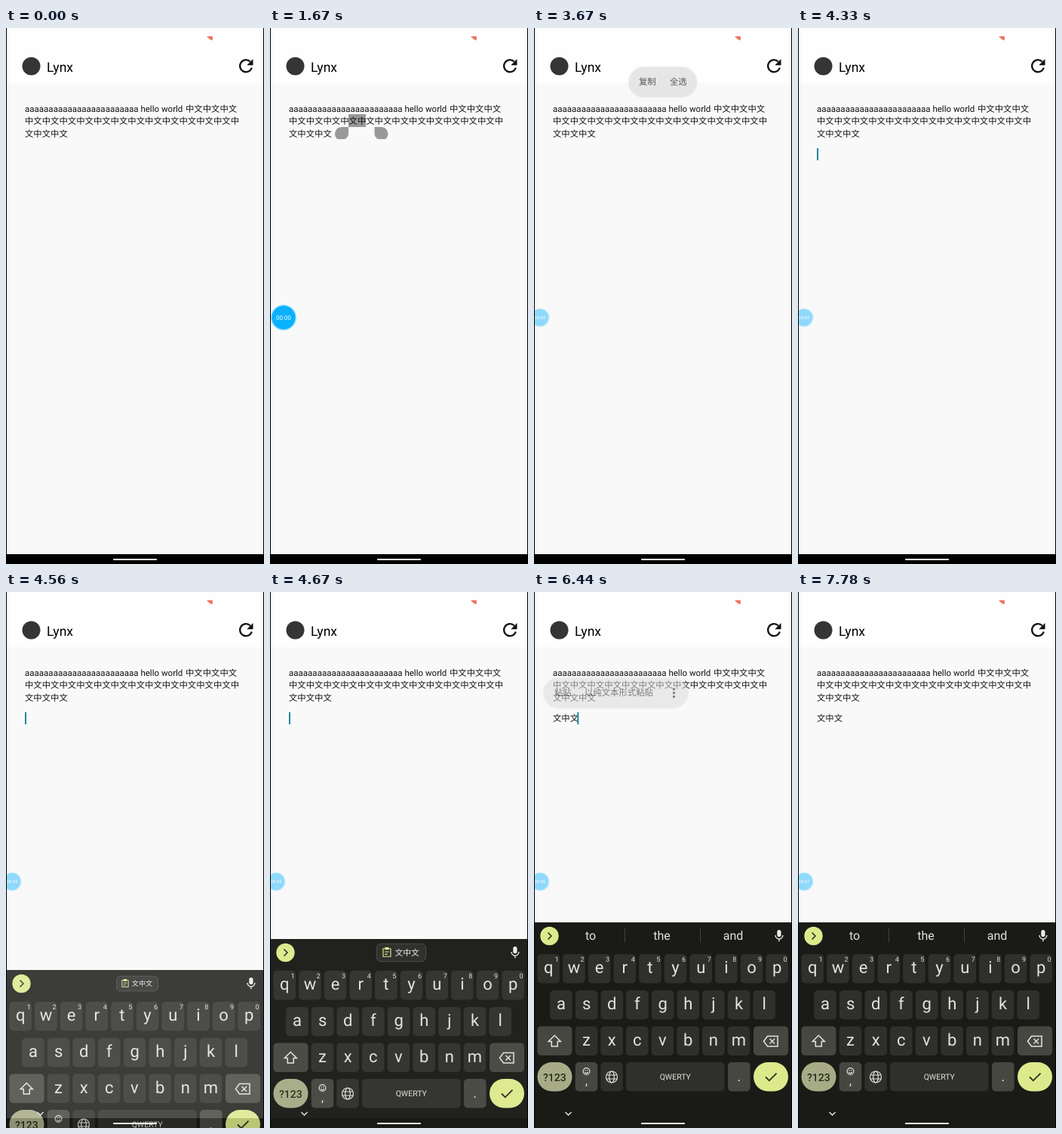
These frames come from a looping animation (342x709 px, 8 s). An HTML page:

```html
<!DOCTYPE html>
<html lang="zh-CN">
<head>
<meta charset="utf-8">
<title>Text selection</title>
<style>
html, body { margin: 0; width: 100%; height: 100%; overflow: hidden; background: #f9f9f9; }
svg { display: block; width: 342px; height: 709px; text-rendering: geometricPrecision; }
text { font-family: Roboto, "Noto Sans CJK SC", "Noto Sans CJK", sans-serif; white-space: pre; }
.zh { font: 11.36px "Noto Sans CJK SC", "Noto Sans CJK", "Noto Sans", sans-serif; fill: #111; }
.mid { text-anchor: middle; }
.line { fill: none; stroke: #e4e4dc; stroke-width: 1.5; }
.menu { filter: drop-shadow(0 .5px 1.5px #0003); }
#chip { transform-box: fill-box; transform-origin: center; }
#keys text { fill: #e4e4dc; }
#keys .dark { fill: #292b1c; }
</style>
</head>
<body>
<svg viewBox="0 0 342 709">
  <rect width="342" height="709" fill="#f9f9f9"/>
  <rect width="342" height="73" fill="#fefefe"/>
  <path d="M266 11h7.8v5.5l-3.8-1.7z" fill="#f0705a"/>
  <circle cx="33.5" cy="50.5" r="12" fill="#353535"/>
  <text x="54" y="57.5" font-size="17.6">Lynx</text>
  <path d="M325.8 52.5A8 8 0 1 1 323.7 44.4" fill="none" stroke="#111" stroke-width="2.3"/>
  <path d="M327.5 41v8.2h-8.2z" fill="#111"/>

  <g id="selection" fill="#999">
    <rect id="range" x="104" y="114" width="34.5" height="17"/>
    <path d="M104 131H95a9 9 0 0 0-5.5 16H99q5-2 5-8z"/>
    <path d="M138.500 131h9a9 9 0 0 1 5.500 16h-9.500q-5-2-5-8z"/>
  </g>
  <text x="25" y="110.600" font-size="11.54" fill="#111">aaaaaaaaaaaaaaaaaaaaaaaa hello world</text>
  <g id="paragraph"></g>
  <text id="pasted" class="zh" x="25" y="171.300">文中文</text>
  <rect id="caret" x="25" y="159" width="2" height="16" fill="#1b8a96"/>
  <path id="caretHandle" d="M26 175.500l6 5.500a8.500 8.500 0 1 1-12 0z" fill="#1b8a96"/>

  <g id="copyMenu">
    <rect id="copyBox" class="menu" x="126" y="52" width="89.500" height="39" rx="19.500" fill="#fff"/>
    <text class="zh" x="139" y="75.300">复制</text>
    <text class="zh" x="180" y="75.300">全选</text>
  </g>
  <g id="pasteMenu">
    <rect id="pasteBox" class="menu" x="13" y="114" width="191" height="39" rx="19.500" fill="#fff"/>
    <text class="zh" x="27" y="137.300">粘贴</text>
    <text class="zh" x="67" y="137.300">以纯文本形式粘贴</text>
    <path d="M185.500 128.500v0m0 5v0m0 5v0" stroke="#222" stroke-width="3.400" stroke-linecap="round"/>
  </g>

  <g id="bubble">
    <circle r="17" fill="#8fdcff"/>
    <circle r="15.500" fill="#0bb0ff"/>
    <g id="timer" fill="#fff" font-size="8"></g>
  </g>

  <rect y="696" width="342" height="13"/>
  <g id="keyboard">
    <rect y="437" width="342" height="280" fill="#1a1b17"/>
    <circle cx="20.500" cy="455" r="12.200" fill="#dcea8c"/>
    <path class="line" d="M18.500 450.500l4.500 4.500-4.500 4.500" style="stroke:#292b1c"/>
    <rect x="322.300" y="447" width="5.200" height="9" rx="2.600" fill="#eee"/>
    <path class="line" d="M320 454a4.900 4.900 0 0 0 9.800 0M324.900 459v3.300"/>
    <g id="chip">
      <rect x="139.500" y="442.500" width="69" height="25" rx="7" fill="#2a2b27" stroke="#52534e"/>
      <path class="line" d="M148.700 449.500h10.500v11h-10.500zM151 454h6M151 457.300h4" style="stroke:#dcea8c;stroke-width:1.200"/>
      <rect x="151.300" y="447.500" width="5.300" height="3.500" fill="#dcea8c"/>
      <text class="zh" x="165" y="458.800" style="fill:#eee">文中文</text>
    </g>
    <g id="words" class="mid" font-size="16" fill="#e4e4dc">
      <text x="75" y="460">to</text>
      <text x="169.500" y="460">the</text>
      <text x="264" y="460">and</text>
      <path d="M120.500 445v19M220.500 445v19" stroke="#40413c"/>
    </g>
    <g id="keys"></g>
    <path class="line" d="M27.300 586.500l8 8h-4v6.500h-8v-6.500h-4z"/>
    <path class="line" d="M309.500 587.500h13.500v13.500h-13.500l-5-6.750zM312.500 591l6.500 6.500m0-6.500l-6.500 6.500"/>
    <g class="line" style="stroke-width:1.200">
      <circle cx="103" cy="641.500" r="7.500"/>
      <ellipse cx="103" cy="641.500" rx="3.300" ry="7.500"/>
      <path d="M96 639h14m-14 5h14"/>
      <circle cx="69.500" cy="634" r="4.300"/>
      <path d="M67.300 635.200q2.200 2.600 4.400 0M67.500 632.700h1.200m1.600 0h1.200"/>
    </g>
    <path class="line" d="M307 641.500l4.800 4.800 9.700-9.700" style="stroke:#292b1c;stroke-width:1.800"/>
  </g>
  <path id="hide" class="line" d="M41.500 688l4 4 4-4"/>
  <rect x="142" y="702" width="58" height="2" rx="1" fill="#fff"/>
  <path d="M.5 0v709M341.500 0v709" stroke="#000"/>
</svg>
<script>
const LOOP = 8000;
const byId = id => document.getElementById(id);

function add(parent, tag, attrs, content = '') {
  const node = document.createElementNS('http://www.w3.org/2000/svg', tag);
  for (const name in attrs) node.setAttribute(name, attrs[name]);
  node.textContent = content;
  return parent.appendChild(node);
}

// Paragraph
const pair = n => '中文'.repeat(n);
[[238, pair(3)], [25, pair(12) + '中'], [25, '文' + pair(2)]].forEach(([x, line], i) =>
  add(byId('paragraph'), 'text', { class: 'zh', x, y: 110.6 + 16.5 * i }, line));

// Keyboard
const KEY = '#2f302b', SIDE = '#474741', PITCH = 33.65;
const keys = byId('keys');
const keyBox = (x, y, width, fill = KEY, rx = 5) =>
  add(keys, 'rect', { x, y, width, height: 38.5, rx, fill });
const label = (x, y, size, content, cls = '') =>
  add(keys, 'text', { x, y, 'font-size': size, class: 'mid ' + cls }, content);

[['qwertyuiop', 19.3, 479], ['asdfghjkl', 36, 527], ['zxcvbnm', 69.5, 574.5]].forEach(([row, start, y], r) =>
  [...row].forEach((letter, i) => {
    const x = start + PITCH * i;
    keyBox(x - 14.8, y, 29.6);
    label(x, y + 25, 22, letter);
    if (!r) label(x + 11, y + 10, 9, (i + 1) % 10);
  }));
keyBox(4.5, 574.5, 46, SIDE);
keyBox(291, 574.5, 46, SIDE);
keyBox(4.5, 622, 46, '#a7ac87', 19.2);
keyBox(54.700, 622, 29.6, SIDE);
keyBox(88.300, 622, 29.6);
keyBox(122, 622, 130.5);
keyBox(257, 622, 29.6, SIDE);
keyBox(291, 622, 46, '#dcea8c', 19.2);
label(27.3, 646.5, 14, '?123', 'dark').setAttribute('font-weight', 500);
label(69.5, 651.5, 16, ',');
label(187.3, 645.3, 10.5, 'QWERTY');
label(271.5, 647, 18, '.');

// Every track holds each value until its next step.
function track(node, prop, steps) {
  const frames = steps.map(([time, value]) =>
    ({ offset: time / LOOP, [prop]: value, easing: 'step-end' }));
  frames.push({ offset: 1, [prop]: steps.at(-1)[1] });
  node.animate(frames, { duration: LOOP, iterations: Infinity });
}
const fade = (id, ...steps) => track(byId(id), 'opacity', [[0, 0], ...steps]);
const place = (x, scale) => `translate(${x}px, 383px) scale(${scale})`;

const seconds = [[0, 0], [2, 2890], [3, 3110], [4, 4110], [5, 5110], [6, 6110], [7, 7110]];
seconds.forEach(([second, from], i) => {
  const text = add(byId('timer'), 'text', { class: 'mid', y: 2.9 }, '00:0' + second);
  const steps = from ? [[0, 0], [from, 1]] : [[0, 1]];
  if (seconds[i + 1]) steps.push([seconds[i + 1][1], 0]);
  track(text, 'opacity', steps);
});

fade('bubble', [110, .3], [220, .6], [330, .9], [440, 1], [3110, .85], [3220, .6], [3330, .45]);
track(byId('bubble'), 'transform', [
  [0, place(18, .6)], [110, place(18, .6)], [220, place(18, .8)], [330, place(18, .95)], [440, place(18, 1)],
  [3110, place(15, .92)], [3220, place(11, .8)], [3330, place(8, .72)]]);

fade('selection', [1670, 1], [3670, 0]);
track(byId('range'), 'width', [[0, '23px'], [2220, '34.5px']]);
fade('copyMenu', [2780, 1], [3670, .7], [3780, .35], [3890, 0]);
track(byId('copyBox'), 'fill', [[0, '#fff'], [3670, '#ddd']]);

fade('caret', [4330, 1], [4890, 0], [5440, 1], [6780, 0], [7330, 1], [7780, 0]);
track(byId('caret'), 'transform', [[0, 'translateX(0px)'], [6330, 'translateX(32.3px)']]);
fade('caretHandle', [5670, 1], [6330, 0]);
fade('pasteMenu', [5670, .3], [5780, .8], [5890, 1], [6330, .85], [6440, .55], [6560, 0]);
track(byId('pasteBox'), 'fill', [[0, '#fff'], [6220, '#ddd']]);
fade('pasted', [6330, 1]);

fade('keyboard', [4560, .85], [4670, .97], [4780, 1]);
track(byId('keyboard'), 'transform',
  [[0, 63], [4670, 22], [4780, 6], [4890, 0]].map(([time, y]) => [time, `translateY(${y}px)`]));
fade('hide', [4560, 1]);
fade('chip', [4560, 1], [6330, 0]);
track(byId('chip'), 'transform', [[0, 'scale(.8)'], [4670, 'scale(.95)'], [4780, 'scale(1)']]);
fade('words', [6330, 1]);
</script>
</body>
</html>
```
